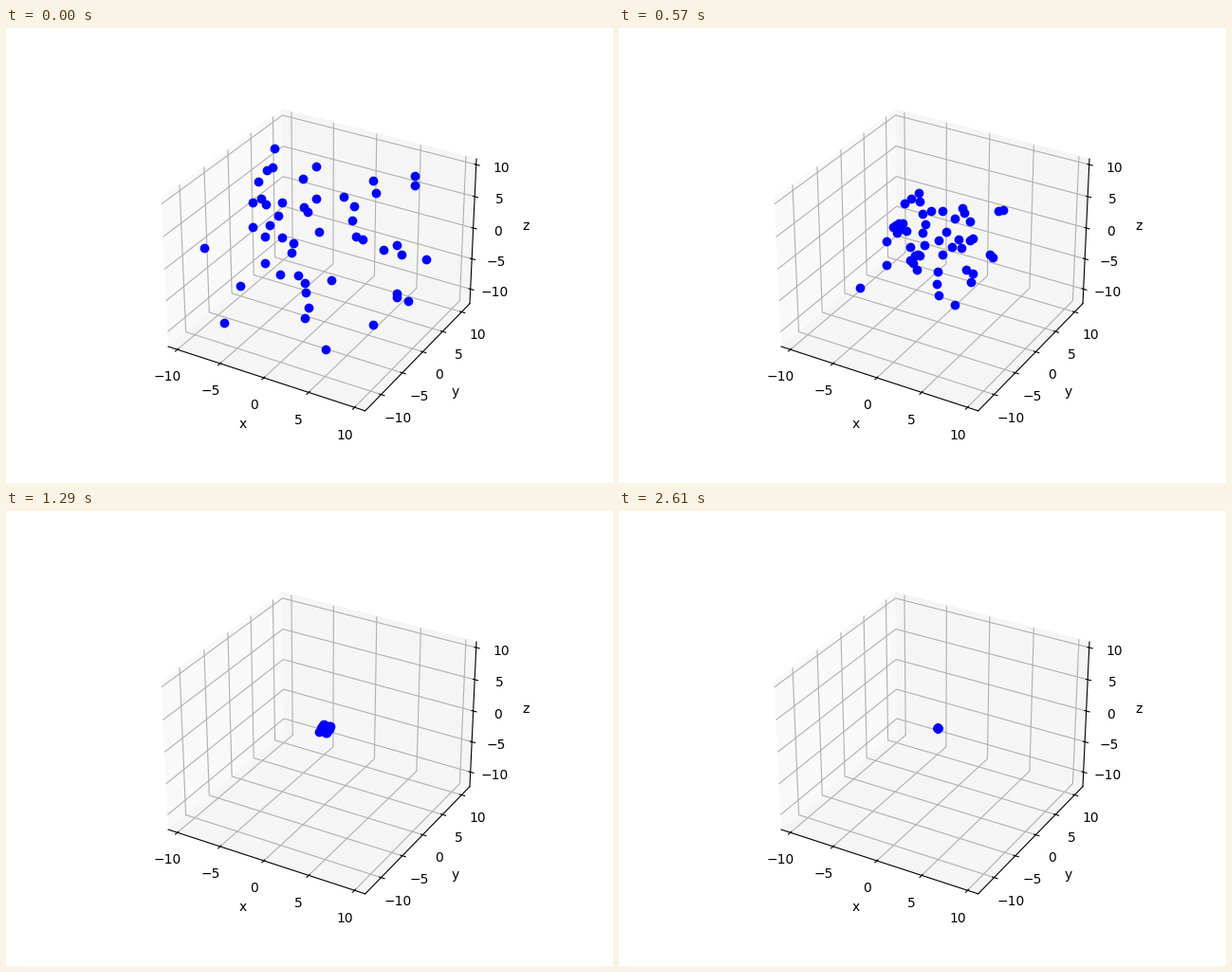
Recreate the animation shown at these times as a matplotlib script. Size 640 by 480 pixels, loop 3030 ms.

```python
import numpy as np
import matplotlib.pyplot as plt
from matplotlib.animation import FuncAnimation
from matplotlib.lines import Line2D
from matplotlib.transforms import IdentityTransform

W, H = 640, 480
FRAMES, STEP_MS = 101, 30
COUNT = 50
INERTIA = 0.71

# Where the scene's (0, 0, 0) lands on the stage, y pointing down,
# and how far one unit along x, y and z reaches there.
ORIGIN = np.array([336.49962, 229.4935])
UNITS = np.array([(9.25, 2.67), (4.63, -4.01), (0, -6.64)])

# Outermost particles: start on the stage, then where they would coast to.
OUTER = np.array([
    (283, 127, 271, 147), (327, 146, 299, 127), (431, 156, 463, 161),
    (209, 232, 235, 222), (443, 244, 442, 252), (230, 311, 184, 312),
    (337, 339, 337, 326), (387, 313, 369, 345), (424, 288, 404, 284),
])


def make_swarm(seed):
    """Start, coasting goal and pull of every particle."""
    rng = np.random.default_rng(seed)
    inner = COUNT - len(OUTER)
    place = rng.uniform(-9, 9, (inner, 3))
    goal = np.clip(place + rng.uniform(-4, 4, place.shape), -9, 9)
    start = np.vstack([OUTER[:, :2], ORIGIN + place @ UNITS])
    aim = np.vstack([OUTER[:, 2:], ORIGIN + goal @ UNITS])
    pull = np.append(np.full(len(OUTER), 0.0017),
                     rng.uniform(0.0017, 0.0022, inner))
    return start, aim, pull[:, None]


START, AIM, PULL = make_swarm(7)


def swarm(n):
    """Damped drift, drawn in by a steadily growing pull."""
    free = START + (AIM - START) * (1 - INERTIA ** n)
    return ORIGIN + (free - ORIGIN) * np.exp(-PULL * n * n)


fig = plt.figure(figsize=(W / 100, H / 100), dpi=100)
ax = fig.add_subplot(projection="3d")
ax.set(xlim=(-11.08, 11.145), ylim=(-13.64, 12.2), zlim=(-12.42, 10.88),
       xlabel="x", ylabel="y", zlabel="z")
for axis, shade in ((ax.xaxis, 0.978), (ax.yaxis, 0.96), (ax.zaxis, 0.96)):
    axis.set_ticks(range(-10, 11, 5))
    axis.set_pane_color((shade, shade, shade, 1))

dots = Line2D([], [], ls="", marker="o", color="blue",
              transform=IdentityTransform())
fig.add_artist(dots)


def update(n):
    x, y = swarm(n).T
    dots.set_data(x, H - y)
    return dots,


anim = FuncAnimation(fig, update, frames=FRAMES, interval=STEP_MS,
                     repeat=True, repeat_delay=0)
plt.show()
```
